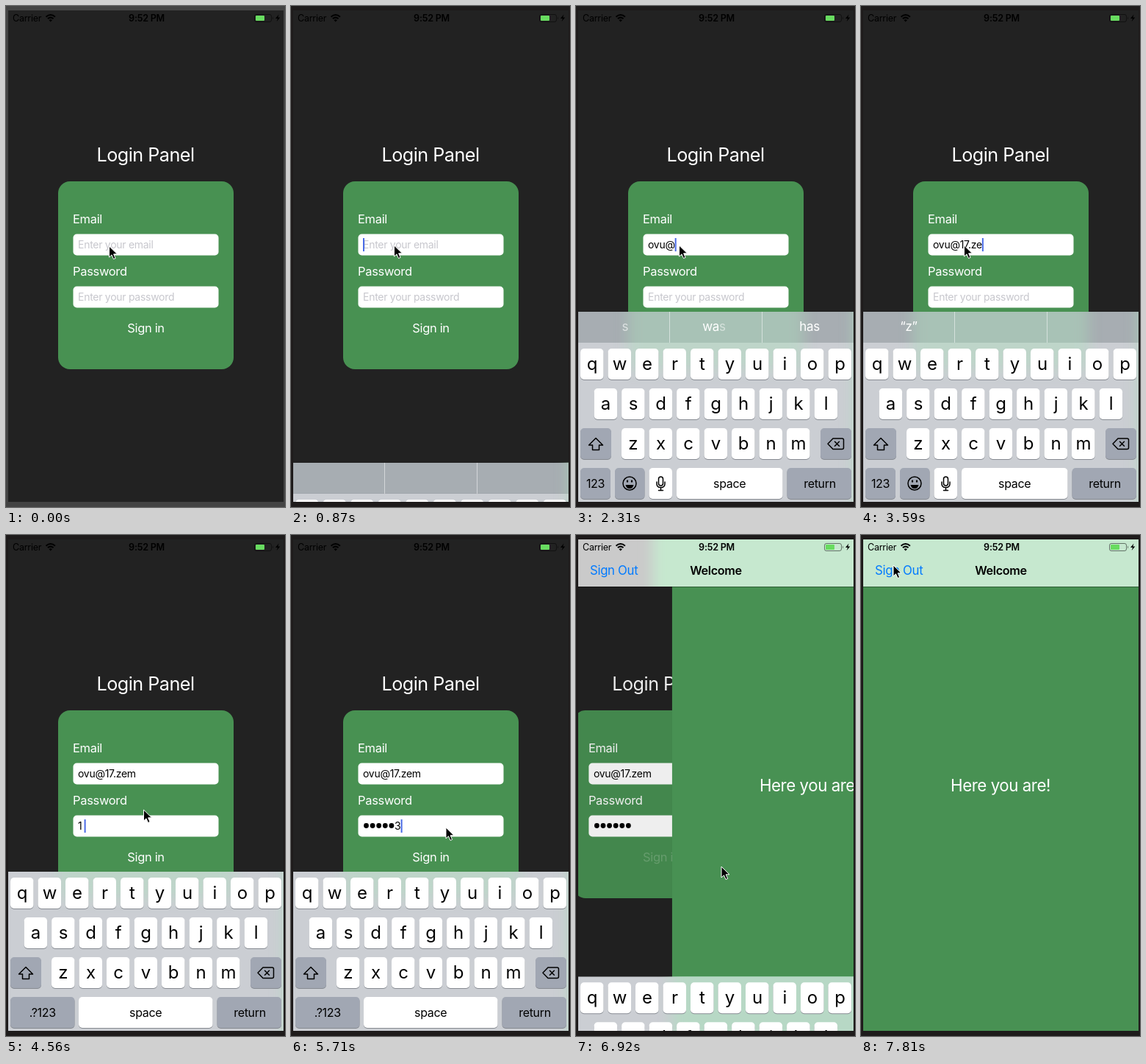
An HTML page that plays this animation: 380x680 px, repeating every 7990 ms.

```html
<!DOCTYPE html>
<html lang="en">
<head>
<meta charset="utf-8">
<title>Login panel</title>
<style>
  html, body { margin: 0; width: 100%; height: 100%; overflow: hidden; background: #1e1b1b; }
  svg { display: block; width: 380px; height: 680px; }
  text { font-family: Inter, Roboto, sans-serif; letter-spacing: -.02em; white-space: pre; }
  .mid { text-anchor: middle; }
  .bold { font-weight: 600; }
  .label { font-size: 16.5px; fill: #fff; }
  .input { font-size: 14px; fill: #000; }
  .hint { font-size: 14px; fill: #c7c7cd; }
  .letter { font-size: 24px; }
  .word { font-size: 16px; }
  .guess { font-size: 17px; fill: #fff; }
  .line { fill: none; stroke: #000; stroke-width: 1.5; stroke-linejoin: round; stroke-linecap: round; }
</style>
</head>
<body>
<svg viewBox="0 0 380 680">
  <defs>
    <clipPath id="screenClip"><rect x="3" y="6" width="375" height="667"/></clipPath>
    <clipPath id="boardClip"><rect id="boardArea" x="3" y="415" width="375" height="258"/></clipPath>
    <clipPath id="navClip"><rect x="3" y="6" width="375" height="64"/></clipPath>
    <filter id="blur" filterUnits="userSpaceOnUse" x="-100" y="-100" width="700" height="900">
      <feGaussianBlur stdDeviation="9"/>
    </filter>
  </defs>
  <rect id="edge" width="380" height="680"/>
  <g clip-path="url(#screenClip)">
    <rect x="3" y="6" width="375" height="667" fill="#222"/>

    <g id="login">
      <text class="mid" x="190" y="211" font-size="25.2" fill="#fff">Login Panel</text>
      <rect x="71" y="238" width="239" height="255" rx="16" fill="#489152"/>
      <text class="label" x="91" y="294.5">Email</text>
      <rect x="91.5" y="309.5" width="198" height="29" rx="5" fill="#fff"/>
      <text class="hint" id="emailHint" x="98" y="328.5">Enter your email</text>
      <text class="input" id="email" x="98" y="328.5"></text>
      <text class="label" x="91" y="365.5">Password</text>
      <rect x="91.5" y="380.5" width="198" height="29" rx="5" fill="#fff"/>
      <text class="hint" id="passHint" x="98" y="399.5">Enter your password</text>
      <g id="dots"></g>
      <text class="input" id="digit" y="399.5"></text>
      <rect id="caret" width="2" height="18" fill="#4a6be6"/>
      <text class="label mid" id="signIn" x="190.5" y="442.5">Sign in</text>
    </g>
    <rect id="dim" x="3" y="6" width="375" height="667" fill="#000"/>

    <g id="page">
      <rect x="3" y="6" width="375" height="667" fill="#489153"/>
      <text class="mid" x="190" y="348" font-size="22.3" fill="#fff">Here you are!</text>
    </g>

    <g clip-path="url(#boardClip)">
      <rect id="barBase" x="3" y="415" width="375" height="42" fill="#a7adb2"/>
      <rect id="panelBase" x="3" width="375" height="216" fill="#cbced3"/>
      <g filter="url(#blur)" fill="#aae0bc">
        <rect id="cardGlow" y="238" width="239" height="255" opacity=".4"/>
        <rect id="pageGlow" y="-40" width="480" height="760" opacity=".6"/>
      </g>
    </g>
    <g id="bar">
      <path d="M127.5 415v42M253.5 415v42" stroke="#fff" stroke-opacity=".5"/>
      <text class="guess mid" x="65" y="440.5"></text>
      <text class="guess mid" x="188" y="440.5"></text>
      <text class="guess mid" x="318" y="440.5"></text>
    </g>
    <g id="keys">
      <g id="sharedKeys"></g>
      <g id="mailKeys"></g>
      <g id="passKeys"></g>
      <text class="word mid" id="returnText" x="332" y="653.5">return</text>
      <path class="line" d="M27 586.5l9.5 9.5h-5v6.5h-9v-6.5h-5z"/>
      <path class="line" d="M350 587h12.500q2 0 2 2v10.500q0 2-2 2h-12.500l-7-7.250zM352.500 591.300l6 6M358.500 591.300l-6 6"/>
    </g>

    <g id="nav">
      <g clip-path="url(#navClip)">
        <rect x="3" y="6" width="375" height="64" fill="#cacaca"/>
        <rect id="navGlow" y="-40" width="520" height="160" fill="#c6e8cf" filter="url(#blur)"/>
      </g>
      <path d="M3 70.500h375" stroke="#000" stroke-opacity=".35"/>
      <text x="19" y="54" font-size="16.8" fill="#007aff">Sign Out</text>
      <text class="mid bold" x="190.500" y="54" font-size="16.200">Welcome</text>
    </g>

    <text x="9" y="20.500" font-size="12.500">Carrier</text>
    <g fill="none" stroke="#000" stroke-width="2">
      <path d="M54.500 14.800q6.200-5.600 12.400 0M56.900 17.300q3.800-3.400 7.600 0"/>
      <path d="M60.700 21.500l-2.200-2.300q2.200-1.700 4.400 0z" fill="#000" stroke="none"/>
    </g>
    <text class="mid bold" x="191.500" y="20.500" font-size="12.600">9:52 PM</text>
    <rect x="338.500" y="11.500" width="23" height="10" rx="2.500" fill="none" stroke="#000" stroke-opacity=".5"/>
    <path d="M363 14.500q2 2 0 4z" fill-opacity=".5"/>
    <rect x="340" y="13" width="12" height="7" rx="1" fill="#68dc60"/>
    <path d="M371.500 11.500l-4.500 5.500h3l-1.300 4 4.600-5.500h-3z"/>
  </g>
  <path id="pointer" d="M0 0v15l3.500-3.200 2.500 5.700 2.600-1.100-2.500-5.600h4.900z" stroke="#fff" stroke-width="1" stroke-linejoin="round"/>
</svg>

<script>
const LOOP = 7990;
const EMAIL = "ovu@17.zem", EMAIL_TIMES = [1440, 1700, 1960, 2220, 2550, 2800, 3150, 3320, 3590, 3770];
const DIGITS = "123123", DIGIT_TIMES = [4380, 4830, 5000, 5360, 5440, 5530];
const DOT_STEP = 8.6;

// The screen refreshes only in these bursts: start, end, number of steps.
const BURSTS = [[0, 0, 1], [180, 180, 1], [450, 450, 1], [870, 1300, 6], [1440, 2220, 10],
  [2310, 2890, 8], [3150, 3590, 6], [3770, 3770, 1], [3940, 4200, 4], [4380, 4650, 4],
  [4830, 4830, 1], [5000, 5000, 1], [5360, 5530, 3], [5710, 6410, 9], [6580, 7370, 10], [7460, 7810, 5]];
const TICKS = BURSTS.flatMap(([a, b, n]) =>
  Array.from({ length: n }, (_, i) => Math.floor((a + (b - a) * i / Math.max(1, n - 1)) / 10) * 10));

// Pointer tip: time, x, y.
const POINTER = [[0, 140.5, 326], [180, 140.5, 325], [4380, 140.5, 325], [4650, 211, 397],
  [5710, 211, 397], [5880, 224, 351], [6060, 232, 420], [6230, 212, 492], [6410, 198, 450],
  [6840, 198, 450], [7370, 161, 242], [7810, 44, 41]];

const faint = (text, alpha) => `<tspan fill-opacity="${alpha}">${text}</tspan>`;
const GUESSES = [[0, []], [1440, ["“o”", "of", "on"]], [1700, ["“ov”", "over", "of"]],
  [1960, ["“ovu”", "over", "our"]], [2220, []],
  [2310, [faint("i", 0) + faint("s", .6), "wa" + faint("s", .5), "has"]],
  [2390, ["is", "was", "has"]], [2550, []], [2800, ["“17”"]], [3150, ["“17.”"]], [3320, ["“z”"]]];

const $ = id => document.getElementById(id);
const set = (id, attrs) => { for (const k in attrs) $(id).setAttribute(k, attrs[k]); };
const show = (id, on) => set(id, { visibility: on ? "visible" : "hidden" });
const countUntil = (times, t) => times.filter(x => x <= t).length;
const lastBy = (rows, t) => rows.filter(r => r[0] <= t).pop();
const spring = x => x <= 0 ? 0 : 1 - (1 + x) * Math.exp(-x);

function key(x, y, width, text = "", dark = false, style = "letter") {
  const baseline = style === "letter" ? y + 28.5 : y + 26.5;
  return `<rect x="${x}" y="${y + 1}" width="${width}" height="42" rx="5" fill="#878b92"/>
    <rect x="${x}" y="${y}" width="${width}" height="42" rx="5" fill="${dark ? "#a1a7b3" : "#fff"}"/>
    <text class="${style} mid" x="${x + width / 2}" y="${baseline}">${text}</text>`;
}
const row = (letters, x, y) => [...letters].map((c, i) => key(x + 37.5 * i, y, 31.5, c)).join("");

$("sharedKeys").innerHTML = row("qwertyuiop", 6, 465) + row("asdfghjkl", 24.6, 519) + row("zxcvbnm", 62, 573)
  + key(6, 573, 42, "", true) + key(333, 573, 42, "", true) + key(287.5, 627, 87.5, "", true);
$("mailKeys").innerHTML = key(6, 627, 41, "123", true, "word") + key(53, 627, 40.5, "", true)
  + key(99.5, 627, 31.5) + key(137, 627, 144.5, "space", false, "word")
  + `<circle class="line" cx="73" cy="648" r="9"/>
     <path d="M67.500 650h11q-1 5-5.500 5t-5.500-5z"/>
     <ellipse cx="70" cy="645" rx="1.200" ry="1.800"/><ellipse cx="76" cy="645" rx="1.200" ry="1.800"/>
     <rect class="line" x="112.500" y="639" width="6" height="12" rx="3"/>
     <path class="line" d="M110 646v2.500q0 5 5.500 5t5.500-5v-2.500M115.500 653.500v4M112.500 657.500h6"/>`;
$("passKeys").innerHTML = key(6, 627, 87.5, ".?123", true, "word") + key(99, 627, 182.5, "space", false, "word");
$("dots").innerHTML = [...DIGITS].map((_, i) =>
  `<circle cx="${102.5 + DOT_STEP * i}" cy="394.500" r="3.400"/>`).join("");

function pointerAt(t) {
  const i = Math.max(1, POINTER.findIndex(p => p[0] > t));
  if (t >= POINTER.at(-1)[0]) return POINTER.at(-1).slice(1);
  const [a, b] = [POINTER[i - 1], POINTER[i]];
  const f = (t - a[0]) / (b[0] - a[0]);
  return [1, 2].map(k => a[k] + (b[k] - a[k]) * f);
}

function drawForm(t) {
  const typed = EMAIL.slice(0, countUntil(EMAIL_TIMES, t));
  const count = countUntil(DIGIT_TIMES, t);
  const masked = t >= 6580 ? count : Math.max(0, count - 1);
  $("email").textContent = typed;
  show("emailHint", !typed);
  show("passHint", !count);
  [...$("dots").children].forEach((dot, i) => dot.setAttribute("visibility", i < masked ? "visible" : "hidden"));
  $("digit").textContent = masked < count ? DIGITS[count - 1] : "";
  set("digit", { x: 98 + DOT_STEP * masked });

  const onEmail = t < 3940;
  const width = onEmail ? $("email").getComputedTextLength() : DOT_STEP * count;
  set("caret", { x: 98 + width, y: onEmail ? 315 : 386 });
  show("caret", t >= 870 && t < 6580 && !(t >= 6060 && t < 6400));
  set("signIn", { opacity: t >= 6580 ? .2 : 1 });
}

function drawKeyboard(t, push, shift, pageX) {
  const rise = spring((t - 840) * .028);
  const drop = 258 * (1 - rise) + 216 * push;
  const onEmail = t < 3940;
  const barAlpha = onEmail ? 1 : Math.max(0, 1 - (t - 3850) / 350);
  const barTop = barAlpha > 0 ? 415 : 457;
  set("boardArea", { y: barTop + drop });
  set("barBase", { y: 415 + drop, opacity: barAlpha });
  set("panelBase", { y: 457 + drop });
  set("cardGlow", { x: 71 + shift, opacity: .4 * (1 - push) });
  set("pageGlow", { x: pageX });
  set("bar", { transform: `translate(0 ${drop})`, opacity: barAlpha });
  set("keys", { transform: `translate(0 ${drop})` });
  show("mailKeys", onEmail);
  show("passKeys", !onEmail);
  const enabled = (t >= 1440 && onEmail) || t >= 4380;
  set("returnText", { fill: enabled ? "#000" : "#7b808a" });
  const words = onEmail ? lastBy(GUESSES, t)[1] : [];
  $("bar").querySelectorAll("text").forEach((el, i) => { el.innerHTML = words[i] || ""; });
}

function draw(time) {
  const t = TICKS[countUntil(TICKS, time) - 1];
  const push = t >= 7370 ? 1 : spring((t - 6699) * .016);
  const shift = -112.5 * push;
  const offset = 375 * (1 - push);
  set("edge", { fill: t < 450 ? "#434343" : "#1e1b1b" });
  set("login", { transform: `translate(${shift} 0)` });
  set("dim", { opacity: .1 * push });
  set("page", { transform: `translate(${offset} 0)` });
  set("navGlow", { x: 3 + offset - 40 * push });
  show("nav", push > 0);
  drawForm(t);
  drawKeyboard(t, push, shift, 3 + offset);
  set("pointer", { transform: `translate(${pointerAt(t).join(" ")})` });
}

const start = performance.now();
function frame() {
  draw((performance.now() - start) % LOOP);
  requestAnimationFrame(frame);
}
frame();
</script>
</body>
</html>
```
